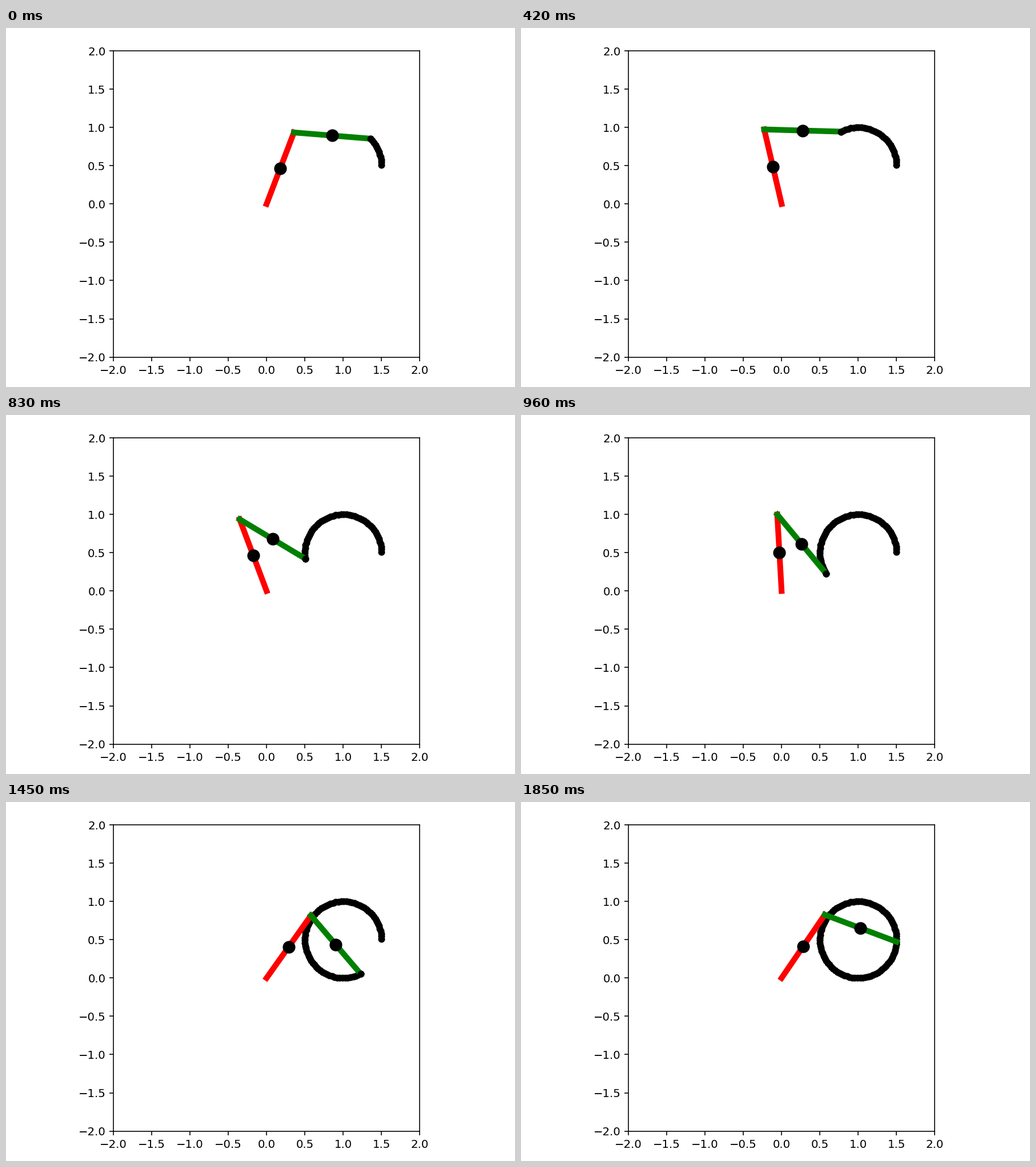
Write a matplotlib script that moves like this. It is 891 px wide and 629 px high and loops after 1950 ms.

```python
import numpy as np
import matplotlib.pyplot as plt
from matplotlib.animation import FuncAnimation

W, H, DPI = 891, 629, 145
LEFT, TOP, SIDE = 187.9, 40.1, 536.5   # axes square in pixels
TICK, LOOP = 10, 1950                  # ms
FIRST, LAST = 11, 89                   # circle samples shown at start and end

angles = np.radians(np.arange(1, 360, 4))
path = np.column_stack([1 + 0.5 * np.cos(angles), 0.5 + 0.5 * np.sin(angles)])

# Steady pace that drags a little towards the end.
n = np.arange(LAST - FIRST + 1)
changes = np.round((22.85 * n + 70 * (n / n[-1]) ** 10) / TICK)


def elbow(tip):
    """Elbow-up joint of two unit links reaching the tip."""
    a = np.arctan2(tip[1], tip[0]) + np.arccos(np.hypot(*tip) / 2)
    return np.array([np.cos(a), np.sin(a)])


plt.rcParams["font.family"] = "DejaVu Sans"
fig = plt.figure(figsize=((W + 0.01) / DPI, (H + 0.01) / DPI), dpi=DPI,
                 facecolor="white")
ax = fig.add_axes([LEFT / W, 1 - (TOP + SIDE) / H, SIDE / W, SIDE / H])
marks = np.linspace(-2, 2, 9)
ax.set(xlim=(-2, 2), ylim=(-2, 2), xticks=marks, yticks=marks)
ax.tick_params(labelsize=9.8)
ax.tick_params(axis="y", pad=3.2)

trace, = ax.plot([], [], "ko", ms=5)
upper, = ax.plot([], [], color="red", lw=5)
fore, = ax.plot([], [], color="green", lw=5)
masses, = ax.plot([], [], "ko", ms=10)
pen, = ax.plot([], [], "ko", ms=5)


def draw(i):
    k = FIRST + np.searchsorted(changes, i, side="right") - 1
    tip = path[k]
    joint = elbow(tip)
    trace.set_data(*path[:k + 1].T)
    upper.set_data([0, joint[0]], [0, joint[1]])
    fore.set_data(*np.array([joint, tip]).T)
    masses.set_data(*np.array([joint / 2, (joint + tip) / 2]).T)
    pen.set_data([tip[0]], [tip[1]])
    pen.set_visible(k < LAST)
    return trace, upper, fore, masses, pen


anim = FuncAnimation(fig, draw, frames=LOOP // TICK, interval=TICK,
                     repeat=True, repeat_delay=0)
plt.show()
```
